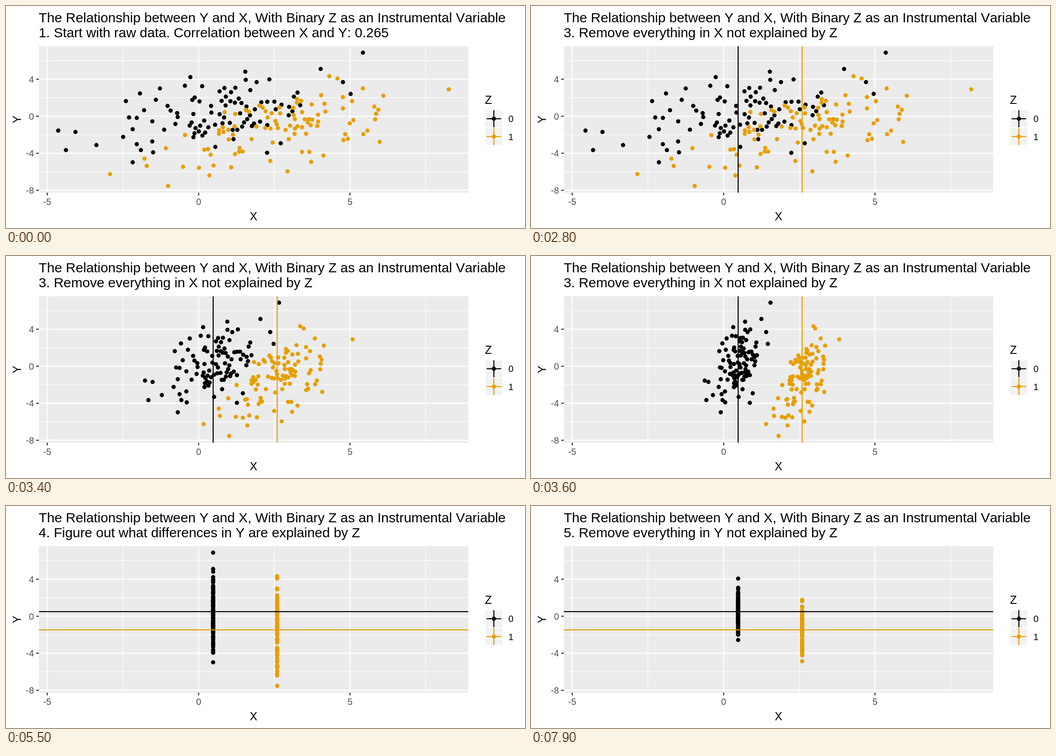
Animation of 1143 by 490 pixels, one loop 8000 ms. Source, as an HTML page with a canvas:

```html
<!DOCTYPE html>
<html lang="en">
<head>
<meta charset="utf-8">
<title>Instrumental variable, step by step</title>
<style>
  html, body { margin: 0; width: 100%; height: 100%; overflow: hidden; background: #fff; }
  canvas { display: block; width: 1143px; height: 490px; }
</style>
</head>
<body>
<canvas id="plot" width="1143" height="490"></canvas>
<script>
const ctx = document.getElementById('plot').getContext('2d');
const LOOP = 8000, STEP = 100, STEPS = 13;
const BLACK = '#000', GOLD = '#E69F00';
const PANEL = { left: 72.5, top: 89, right: 1018, bottom: 412 };
const FONT = '"Liberation Sans", Arial, sans-serif';

const sx = v => 424.2 + v * 66.67;
const sy = v => 243.3 - v * 20.43;

// Outlying points are placed; the dense core of each cloud is scattered by seed.
const groups = [
  {
    color: BLACK, mx: 456.2, my: 233.1,
    core: { n: 61, x: 474, y: 234, rx: 168, ry: 54, tilt: -0.1, seed: 11 },
    outer: [
      786,103, 693,139, 742,168, 759,194, 527,145, 528,163, 552,168, 580,162,
      406,157, 394,176, 432,177, 481,181, 339,182, 295,193, 264,210, 330,207,
      304,230, 271,246, 288,247, 115,275, 153,278, 132,318, 199,307, 258,289,
      279,272, 279,345, 324,323, 297,318, 288,305, 322,299, 461,311, 575,324,
      605,303, 648,219, 642,191, 634,200, 501,294
    ]
  },
  {
    color: GOLD, mx: 597.2, my: 273.3,
    core: { n: 61, x: 548, y: 268, rx: 172, ry: 54, tilt: -0.2, seed: 29 },
    outer: [
      975,184, 712,155, 730,160, 786,182, 831,198, 694,197, 742,201, 762,210,
      811,222, 820,229, 815,238, 813,250, 742,226, 765,252, 757,259, 787,283,
      796,275, 823,300, 747,283, 753,293, 743,296, 699,330, 672,344, 668,322,
      652,322, 620,365, 582,342, 448,374, 496,356, 457,352, 357,397, 229,371,
      305,337, 310,353, 390,355, 425,357, 352,314
    ]
  }
];

function random(seed) {
  let s = seed;
  return () => (s = s * 16807 % 2147483647) / 2147483647;
}

const placed = [];
const isFree = (x, y) => placed.every(p => Math.hypot(p.x - x, p.y - y) > 7);

for (const g of groups) {
  g.points = [];
  for (let i = 0; i < g.outer.length; i += 2) {
    g.points.push({ x: g.outer[i], y: g.outer[i + 1] });
  }
  placed.push(...g.points);
}

for (const { core, points } of groups) {
  const rnd = random(core.seed * 7919);
  for (let made = 0, tries = 0; made < core.n && tries < 5000; tries++) {
    const angle = rnd() * 2 * Math.PI, r = Math.pow(rnd(), 0.55);
    const dx = core.rx * r * Math.cos(angle);
    const x = core.x + dx;
    const y = core.y + core.tilt * dx + core.ry * r * Math.sin(angle);
    if (!isFree(x, y)) continue;
    const p = { x, y };
    points.push(p);
    placed.push(p);
    made++;
  }
}

function line(x1, y1, x2, y2, color, width) {
  ctx.strokeStyle = color;
  ctx.lineWidth = width;
  ctx.beginPath();
  ctx.moveTo(x1, y1);
  ctx.lineTo(x2, y2);
  ctx.stroke();
}

const vline = (x, color, width) => line(x, PANEL.top, x, PANEL.bottom, color, width);
const hline = (y, color, width) => line(PANEL.left, y, PANEL.right, y, color, width);

function dot(x, y, color) {
  ctx.fillStyle = color;
  ctx.beginPath();
  ctx.arc(x, y, 4.7, 0, 2 * Math.PI);
  ctx.fill();
}

function text(str, x, y, size, color = BLACK, align = 'left') {
  ctx.font = size + 'px ' + FONT;
  ctx.fontKerning = 'none';
  ctx.textAlign = align;
  ctx.fillStyle = color;
  ctx.fillText(str, x, y);
}

function drawAxes() {
  ctx.fillStyle = '#EBEBEB';
  ctx.fillRect(PANEL.left, PANEL.top, PANEL.right - PANEL.left, PANEL.bottom - PANEL.top);
  for (const v of [-2.5, 2.5, 7.5]) vline(sx(v), '#fff', 1.2);
  for (const v of [-6, -2, 2, 6]) hline(sy(v), '#fff', 1.2);
  for (const v of [-5, 0, 5]) {
    vline(sx(v), '#fff', 2.3);
    line(sx(v), PANEL.bottom, sx(v), PANEL.bottom + 6, '#333', 2.3);
    text(v, sx(v), 439.3, 20, '#4D4D4D', 'center');
  }
  for (const v of [-8, -4, 0, 4]) {
    hline(sy(v), '#fff', 2.3);
    line(PANEL.left - 6, sy(v), PANEL.left, sy(v), '#333', 2.3);
    text(v, 61.5, sy(v) + 7.4, 20, '#4D4D4D', 'right');
  }
  text('X', 545, 473, 25, BLACK, 'center');
  ctx.save();
  ctx.translate(32.5, 250.5);
  ctx.rotate(-Math.PI / 2);
  text('Y', 0, 0, 25, BLACK, 'center');
  ctx.restore();
}

function drawLegend() {
  text('Z', 1054.8, 215.5, 25);
  groups.forEach((g, i) => {
    const x = 1074.4, y = 248.8 + i * 39.3;
    ctx.fillStyle = '#F2F2F2';
    ctx.fillRect(x - 18.5, y - 18.5, 37, 37);
    line(x, y - 18.8, x, y + 18.8, g.color, 2.3);
    line(x - 16, y, x + 16, y, g.color, 2.3);
    dot(x, y, g.color);
    text(i, 1106.5, y + 7.6, 20);
  });
}

function subtitle(t) {
  if (t < 500) return '1. Start with raw data. Correlation between X and Y: 0.265';
  if (t < 2800) return '2. Figure out what differences in X are explained by Z';
  if (t < 5100) return '3. Remove everything in X not explained by Z';
  if (t < 7400) return '4. Figure out what differences in Y are explained by Z';
  return '5. Remove everything in Y not explained by Z';
}

// Sine in-out, advancing once per step.
function ease(t, start) {
  const p = Math.min(1, Math.max(0, (t - start) / (STEPS * STEP)));
  return (1 - Math.cos(Math.PI * p)) / 2;
}

function draw(t) {
  ctx.fillStyle = '#fff';
  ctx.fillRect(0, 0, 1143, 490);
  text('The Relationship between Y and X, With Binary Z as an Instrumental Variable', 72, 36.3, 29.9);
  text(subtitle(t), 72, 68.6, 29.9);
  drawAxes();

  const kx = ease(t, 2700), ky = ease(t, 7300);
  for (const g of groups) {
    for (const p of g.points) {
      dot(p.x + (g.mx - p.x) * kx, p.y + (g.my - p.y) * ky, g.color);
    }
  }
  for (const g of groups) {
    if (t >= 900 && t < 5100) vline(g.mx, g.color, 2.3);
    if (t >= 5500) hline(g.my, g.color, 2.3);
  }
  drawLegend();
}

const begin = performance.now();
function tick() {
  const t = (performance.now() - begin) % LOOP;
  draw(Math.floor(t / STEP) * STEP);
  requestAnimationFrame(tick);
}
tick();
</script>
</body>
</html>
```
